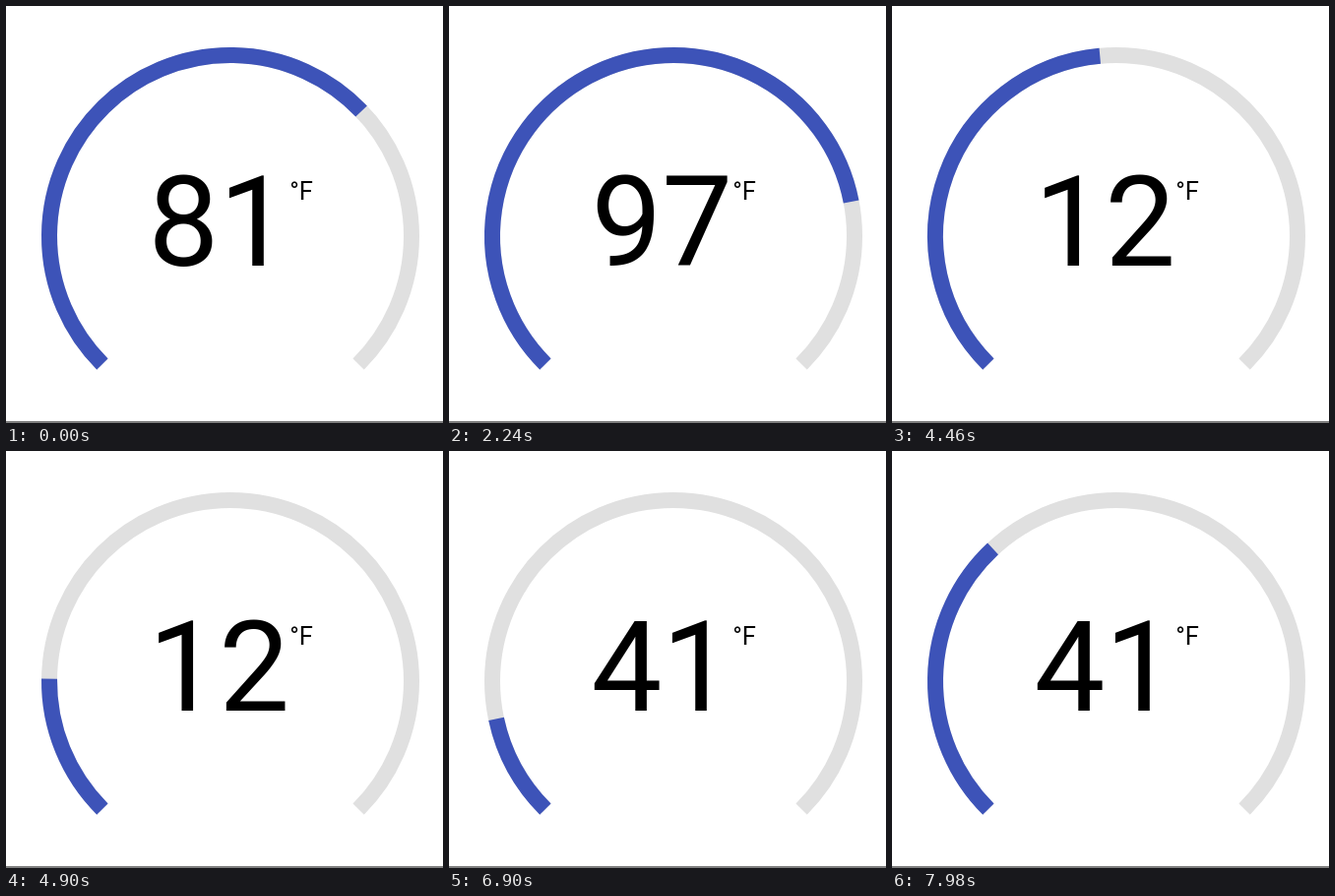
Write an HTML page that moves like this. It is 444 px wide and 424 px high and loops after 8000 ms.

```html
<!DOCTYPE html>
<html lang="en">
<head>
<meta charset="utf-8">
<title>Temperature gauge</title>
<style>
  html, body { margin: 0; height: 100%; overflow: hidden; background: #fff; }
  svg { display: block; width: 444px; height: 424px; }
  path { fill: none; stroke-width: 16; }
  text { font-family: Roboto, sans-serif; }
</style>
</head>
<body>
<svg viewBox="0 0 444 424">
  <path id="track" stroke="#e0e0e0"/>
  <path id="bar" stroke="#3d53b8"/>
  <text id="value" x="144.4" y="264" font-size="128"></text>
  <text x="288.2" y="197" font-size="25.6">°F</text>
  <rect y="422" width="444" height="2" fill="#808080"/>
</svg>
<script>
const LOOP = 8000, DURATION = 1300, MAX = 120, SWEEP = 270;
const CENTER = { x: 228, y: 234 }, RADIUS = 184;

// Each reading: the time its transition starts and the temperature it reaches.
const readings = [
  { start: -1160, temp: 81 },
  { start: 1500, temp: 96.9 },
  { start: 4140, temp: 11.6 },
  { start: 6800, temp: 41 },
];

const track = document.getElementById('track');
const bar = document.getElementById('bar');
const value = document.getElementById('value');

function cubicBezier(x1, y1, x2, y2) {
  const at = (a, b, s) => 3 * a * s * (1 - s) ** 2 + 3 * b * s * s * (1 - s) + s ** 3;
  return x => {
    let low = 0, high = 1;
    for (let i = 0; i < 24; i++) {
      const mid = (low + high) / 2;
      if (at(x1, x2, mid) < x) low = mid; else high = mid;
    }
    return at(y1, y2, (low + high) / 2);
  };
}
const ease = cubicBezier(0.28, 0.3, 0.25, 1);

function point(degrees) {
  const a = degrees * Math.PI / 180;
  return `${CENTER.x + RADIUS * Math.cos(a)} ${CENTER.y + RADIUS * Math.sin(a)}`;
}

function arc(temp) {
  const sweep = SWEEP * temp / MAX;
  return `M${point(135)}A${RADIUS} ${RADIUS} 0 ${sweep > 180 ? 1 : 0} 1 ${point(135 + sweep)}`;
}

function draw(time) {
  const index = readings.findLastIndex(r => r.start <= time);
  const { start, temp } = readings[index];
  const from = index ? readings[index - 1].temp : 0;
  const progress = Math.min((time - start) / DURATION, 1);
  bar.setAttribute('d', arc(from + (temp - from) * (progress < 1 ? ease(progress) : 1)));
  value.textContent = Math.round(temp);
}

track.setAttribute('d', arc(MAX));
const origin = performance.now();
function frame() {
  draw((performance.now() - origin) % LOOP);
  requestAnimationFrame(frame);
}
frame();
</script>
</body>
</html>
```
